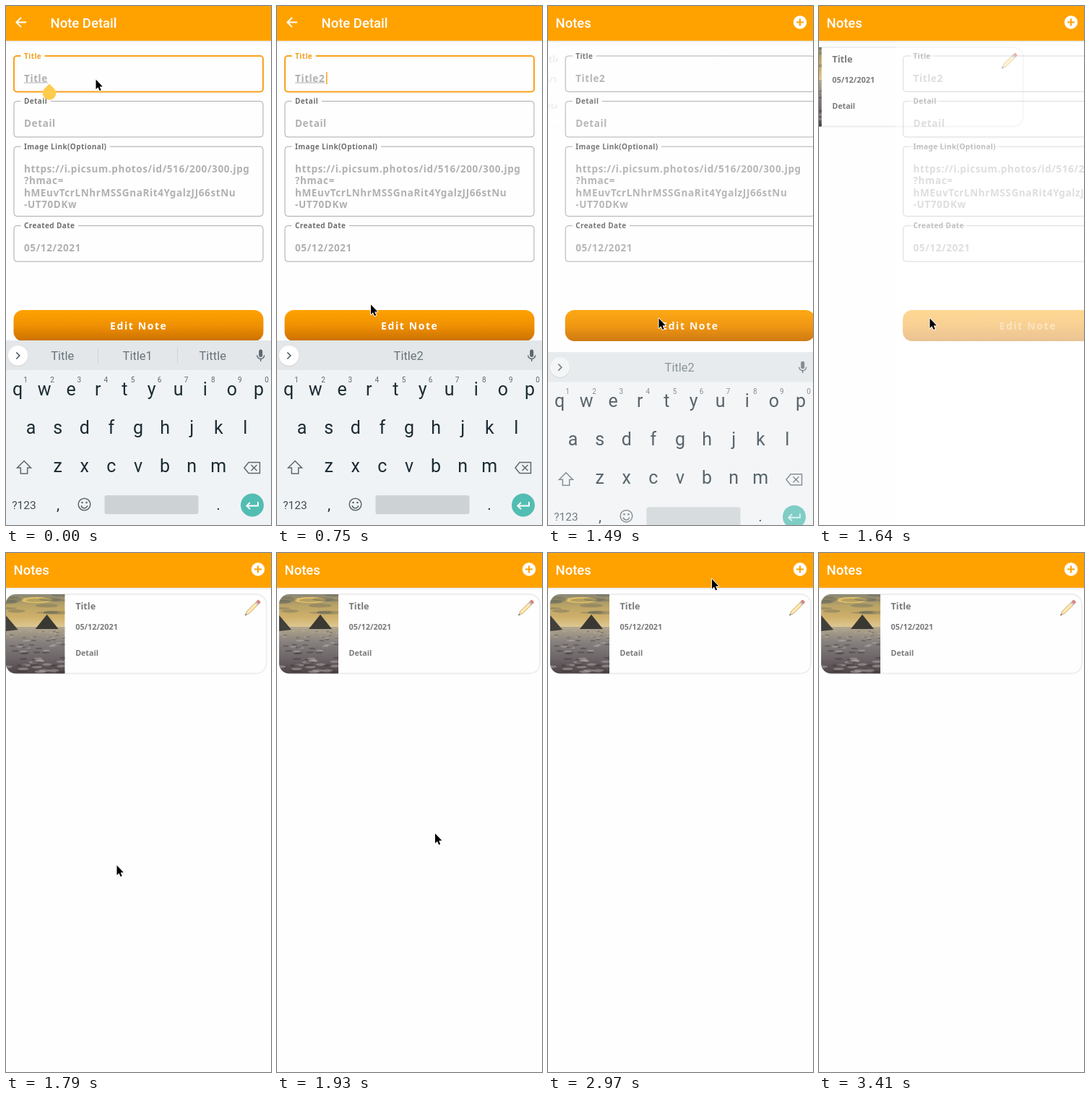
Write an HTML page with a canvas that moves like this. It is 367 by 717 pixels and loops after 3700 ms.

```html
<!DOCTYPE html>
<html lang="en">
<head>
<meta charset="utf-8">
<title>Note editor</title>
<style>
html, body { margin: 0; width: 100%; height: 100%; overflow: hidden; background: #fefefe; }
canvas { display: block; width: 100%; height: 100%; }
</style>
</head>
<body>
<canvas id="stage"></canvas>
<script>
const W = 367, H = 717, LOOP = 3700, STEP = 148;
const TYPED = 2, SAVED = 10;
const canvas = document.getElementById('stage');
const ctx = canvas.getContext('2d');
const scale = window.devicePixelRatio || 1;
canvas.width = W * scale;
canvas.height = H * scale;

const NOTO = '"Noto Sans", sans-serif', ROBOTO = 'Roboto, sans-serif';
const ORANGE = '#ffa200', PAPER = '#fefefe', KEY = '#1c2c34', ICON = '#5c686e';

// Pointer key points: [step, x, y]
const PATH = [
  [2, 124.5, 101.5], [4, 113, 356], [5, 130, 412.5], [7, 153.5, 431.5], [12, 153.5, 431.5],
  [13, 219, 387.5], [14, 325, 232], [17, 314.5, 176], [18, 313, 174], [20, 227, 36], [22, 220, 327]
];

const lerp = (a, b, p) => a + (b - a) * p;
const clamp = v => Math.max(0, Math.min(1, v));

function random(seed) {
  return () => (seed = seed * 16807 % 2147483647) / 2147483647;
}

function text(str, x, y, font, color, align = 'left', spacing = 0) {
  ctx.font = font;
  ctx.letterSpacing = spacing + 'px';
  ctx.textAlign = align;
  ctx.fillStyle = color;
  ctx.fillText(str, x, y);
  const width = ctx.measureText(str).width;
  ctx.letterSpacing = '0px';
  return width;
}

function box(x, y, w, h, r, color) {
  ctx.beginPath();
  ctx.roundRect(x, y, w, h, r);
  if (!color) return;
  ctx.fillStyle = color;
  ctx.fill();
}

function oval(x, y, rx, ry, color) {
  ctx.beginPath();
  ctx.ellipse(x, y, rx, ry, 0, 0, Math.PI * 2);
  ctx.fillStyle = color;
  ctx.fill();
}

const disc = (x, y, r, color) => oval(x, y, r, r, color);

function path(points, close) {
  ctx.beginPath();
  points.forEach(([x, y]) => ctx.lineTo(x, y));
  if (close) ctx.closePath();
}

function stroke(color, width) {
  ctx.strokeStyle = color;
  ctx.lineWidth = width;
  ctx.stroke();
}

function line(points, color, width, close) {
  path(points, close);
  stroke(color, width);
}

function shape(points, color) {
  path(points, true);
  ctx.fillStyle = color;
  ctx.fill();
}

function arc(x, y, r, from, to, color, width) {
  ctx.beginPath();
  ctx.arc(x, y, r, from, to);
  stroke(color, width);
}

// Chevron at (x, y); negative size points left
function chevron(x, y, size, color, width) {
  const d = Math.abs(size);
  line([[x - size, y - d], [x, y], [x - size, y + d]], color, width);
}

function vertical(y0, y1, ...colors) {
  const g = ctx.createLinearGradient(0, y0, 0, y1);
  colors.forEach((c, i) => g.addColorStop(i / (colors.length - 1), c));
  return g;
}

function layer(x, y, alpha, draw) {
  if (alpha <= 0) return;
  ctx.save();
  ctx.translate(x, y);
  ctx.globalAlpha = alpha;
  draw();
  ctx.restore();
}

function header(detail) {
  box(0, 47, W, 4, 0, vertical(47, 51, '#dedede', PAPER));
  box(0, 0, W, 48, 0, ORANGE);
  const font = '500 18.5px ' + ROBOTO;
  if (detail) {
    line([[28, 22.5], [14.5, 22.5]], '#fff', 2);
    chevron(14.4, 22.5, -6.6, '#fff', 2);
    text('Note Detail', 61.5, 29.5, font, '#fff');
  } else {
    text('Notes', 10.5, 29.5, font, '#fff');
    disc(349, 22.5, 9.2, '#fff');
    line([[344, 22.5], [354, 22.5]], ORANGE, 2);
    line([[349, 17.5], [349, 27.5]], ORANGE, 2);
  }
}

function field(label, y, h, lines, focused) {
  box(11, y, 345, h, 4);
  stroke(focused ? '#faa21c' : '#a9a9a9', focused ? 2 : 1);
  const font = '700 10px ' + NOTO;
  ctx.font = font;
  ctx.letterSpacing = '0.4px';
  box(20.5, y - 3, ctx.measureText(label).width + 9, 6, 0, PAPER);
  text(label, 25, y + 3.7, font, focused ? '#f5a01e' : '#6f6f6f', 'left', .4);
  return lines.map((s, i) =>
    text(s, 25, y + 35.5 + i * 16.4, '700 13.5px ' + NOTO, '#b1b1b1', 'left', .6))[0];
}

function detailScreen(step) {
  const focused = step < SAVED, typed = step >= TYPED;
  const fields = {
    'Title': [typed ? 'Title2' : 'Title'],
    'Detail': ['Detail'],
    'Image Link(Optional)': [
      'https://i.picsum.photos/id/516/200/300.jpg', '?hmac=',
      'hMEuvTcrLNhrMSSGnaRit4YgalzJJ66stNu', '-UT70DKw'
    ],
    'Created Date': ['05/12/2021']
  };
  box(0, 51, W, H - 51, 0, PAPER);
  let y = 69, titleWidth;
  for (const [label, lines] of Object.entries(fields)) {
    const h = 33.8 + 15.6 * lines.length;
    const width = field(label, y, h, lines, focused && label === 'Title');
    titleWidth ??= width;
    y += h + 13.2;
  }
  box(10.5, 420, 346, 43, 13, vertical(420, 463, ORANGE, '#ef9002', '#cb7000'));
  text('Edit Note', 144, 447, '700 14px ' + NOTO, '#fff', 'left', 1.6);

  if (!focused) return;
  box(25, 105.5, titleWidth, 1, 0, '#b1b1b1');
  if (typed && (step < 6 || step === 9)) box(68, 91, 1.6, 17, 0, '#f8aa30');
  if (step < 3) {
    disc(60, 120.5, 9.3, '#ffcb4d');
    shape([[60, 107.5], [67, 114.4], [53, 114.4]], '#ffcb4d');
  }
}

// Sunset coast in soft tones
function photo() {
  const rnd = random(41);
  ctx.save();
  box(3, 57, 82, 109.5, [14, 0, 0, 14]);
  ctx.clip();
  box(3, 57, 82, 47, 0, vertical(57, 104, '#8a8775', '#b9a366', '#cfb06a', '#e0cb98'));
  oval(46, 65, 22, 4, '#e5c368');
  for (let i = 0; i < 14; i++) {
    oval(3 + rnd() * 82, 57 + rnd() * 26, 8 + rnd() * 10, 1 + rnd() * 2, 'rgba(92,94,88,.35)');
  }
  box(3, 102, 82, 65, 0, vertical(102, 167, '#b3a78d', '#857f7d', '#6d6567', '#4c4347'));
  shape([[44, 105], [60, 85], [76, 105]], '#3a3833');
  shape([[3, 86], [20, 106], [3, 108]], '#42403b');
  for (let i = 0; i < 70; i++) {
    const depth = rnd(), size = 2 + depth * 6;
    const tone = rnd() < .5 ? '202,195,190' : '58,50,52';
    oval(3 + rnd() * 82, 106 + depth * 60, size, size / 4, `rgba(${tone},.4)`);
  }
  ctx.restore();
}

function pencil() {
  ctx.save();
  ctx.translate(334.3, 86.3);
  ctx.rotate(-Math.PI / 4);
  shape([[0, 0], [6, -2.4], [6, 2.4]], '#efd8bb');
  shape([[0, 0], [2.4, -1], [2.4, 1]], '#43372f');
  box(6, -2.4, 16, 4.8, 0, '#fbdd97');
  box(6, -.8, 16, 1.6, 0, '#fff1c2');
  box(22, -2.4, 2.4, 4.8, 0, '#c2c8ca');
  box(24.4, -2.4, 4.2, 4.8, [0, 2, 2, 0], '#e37d85');
  line([[0, 0], [6, -2.4], [28, -2.4], [28, 2.4], [6, 2.4]], '#a98a60', .5, true);
  ctx.restore();
}

function listScreen() {
  box(3, 57, 361, 109.5, 14, PAPER);
  stroke('#eeeeee', 1.8);
  photo();
  text('Title', 99.5, 77.7, '700 12.7px ' + NOTO, '#7b7b7b');
  text('05/12/2021', 99.5, 105.6, '700 10.9px ' + NOTO, '#7b7b7b');
  text('Detail', 99.5, 141.7, '700 10.7px ' + NOTO, '#7b7b7b');
  pencil();
}

function suggestions(step) {
  box(0, 462, W, 41, 0, '#e3e7ea');
  disc(16.5, 484, 14, '#d3d7da');
  disc(16.5, 483, 13.7, '#fff');
  chevron(18.8, 483, 4.5, '#4c575c', 1.6);
  const words = step < TYPED ? ['Title', 'Title1', 'Tittle'] : ['Title2'];
  words.forEach((s, i) => {
    const x = 182.2 + (i - (words.length - 1) / 2) * 104;
    text(s, x, 489, '400 16.5px ' + ROBOTO, '#687379', 'center');
    if (i) line([[17.5 + i * 110, 472], [17.5 + i * 110, 494]], '#cfd4d7', 1);
  });
  box(350.2, 474.5, 5, 10.5, 2.5, ICON);
  arc(352.7, 482.5, 5, 0, Math.PI, ICON, 1.4);
  line([[352.7, 487.5], [352.7, 491]], ICON, 1.5);
}

function keyboard(step) {
  box(0, 462, W, H - 462, 0, '#f0f3f5');
  suggestions(step);
  const pitch = 37.1;
  ['qwertyuiop', 'asdfghjkl', 'zxcvbnm'].forEach((row, r) => [...row].forEach((c, i) => {
    const x = 183 + (i - (row.length - 1) / 2) * pitch;
    text(c, x, 538 + r * 53, '400 25px ' + ROBOTO, KEY, 'center');
    if (r === 0) text((i + 1) % 10, x + 11, 519.5, '400 10px ' + ROBOTO, ICON, 'center');
  }));

  // Shift and backspace
  line([[25, 628.5], [34.5, 638], [29.7, 638], [29.7, 646], [20.3, 646], [20.3, 638], [15.5, 638]], ICON, 1.5, true);
  line([[330, 638], [336, 630.5], [351.5, 630.5], [351.5, 645.5], [336, 645.5]], ICON, 1.5, true);
  line([[339.5, 634], [347.5, 642]], ICON, 1.5);
  line([[347.5, 634], [339.5, 642]], ICON, 1.5);

  text('?123', 25, 695, '400 15.5px ' + ROBOTO, '#3f4d54', 'center');
  text(',', 72, 696, '400 21px ' + ROBOTO, KEY, 'center');
  text('.', 294, 696, '400 21px ' + ROBOTO, KEY, 'center');

  arc(108.5, 688.5, 8.3, 0, Math.PI * 2, ICON, 1.5);
  arc(108.5, 689.5, 4.3, .15, Math.PI - .15, ICON, 1.5);
  for (const side of [-3, 3]) disc(108.5 + side, 686, 1.3, ICON);

  box(136.5, 676, 130, 26, 3, '#cdd2d5');
  disc(341, 689.5, 16, '#52bdb2');
  line([[349, 685], [349, 690.5], [333.5, 690.5]], '#fff', 1.9);
  chevron(333.3, 690.5, -4.7, '#fff', 1.9);
}

function pointer(step) {
  if (step === 21 || step > 22) return;
  const next = Math.max(1, PATH.findIndex(k => k[0] >= step));
  const [s0, x0, y0] = PATH[next - 1], [s1, x1, y1] = PATH[next];
  const p = clamp((step - s0) / (s1 - s0));
  const x = lerp(x0, x1, p), y = lerp(y0, y1, p);
  const arrow = [[0, 0], [0, 13.6], [3, 10.8], [5.1, 15.6], [7.2, 14.7], [5.2, 10], [9.3, 9.8]]
    .map(([a, b]) => [x + a, y + b]);
  ctx.lineJoin = 'round';
  line(arrow, '#fff', 1.8, true);
  shape(arrow, '#000');
  ctx.lineJoin = 'miter';
}

function draw(t) {
  const step = Math.floor(t / STEP);
  const slide = clamp((step - SAVED + 1) / 3.03) ** 3;
  ctx.setTransform(scale, 0, 0, scale, 0, 0);
  box(0, 0, W, H, 0, PAPER);
  layer(-114 * (1 - slide), 0, Math.min(1, slide * 3.5), listScreen);
  layer(W * slide, 0, 1 - 2 * slide, () => detailScreen(step));
  header(step < SAVED);
  layer(0, 450 * slide, 1 - 8 * slide, () => keyboard(step));
  pointer(step);
}

const start = performance.now();
function tick() {
  draw((performance.now() - start) % LOOP);
  requestAnimationFrame(tick);
}
tick();
</script>
</body>
</html>
```
